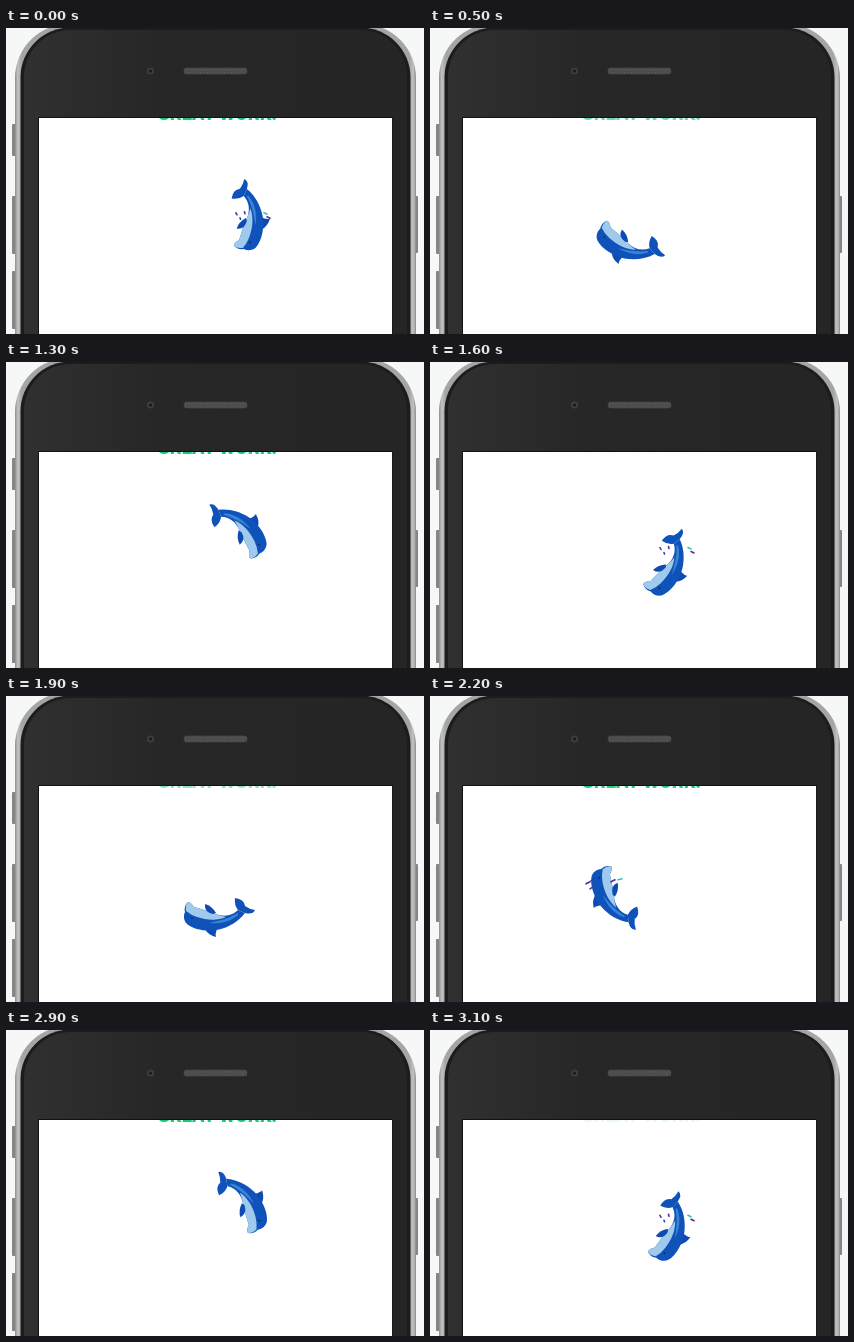
Animation of 418x306 px, one loop 3.2 s. Source, as an HTML page:

```html
<!DOCTYPE html>
<html lang="en">
<head>
<meta charset="utf-8">
<title>Dolphin loader</title>
<style>
  html, body { margin: 0; width: 100%; height: 100%; overflow: hidden; background: #f6f7f7; }
  svg { display: block; }
  #praise { font: 900 18.4px Roboto, sans-serif; fill: #1cc97c; text-anchor: middle; }
</style>
</head>
<body>
<svg width="418" height="306" viewBox="0 0 418 306">
  <defs>
    <pattern id="mesh" width="3" height="3" patternUnits="userSpaceOnUse">
      <rect width="3" height="3" fill="#444"/>
      <path d="M0 0L3 3M3 0L0 3" stroke="#5c5c5c" stroke-width=".7"/>
    </pattern>
    <linearGradient id="rim">
      <stop offset="0" stop-color="#8d8d8d"/>
      <stop offset=".007" stop-color="#c2c2c2"/>
      <stop offset=".016" stop-color="#a5a5a5"/>
      <stop offset=".984" stop-color="#a5a5a5"/>
      <stop offset=".993" stop-color="#c2c2c2"/>
      <stop offset="1" stop-color="#8d8d8d"/>
    </linearGradient>
    <linearGradient id="glass">
      <stop offset="0" stop-color="#303030"/>
      <stop offset=".35" stop-color="#272727"/>
      <stop offset="1" stop-color="#252525"/>
    </linearGradient>
  </defs>

  <g fill="#858585">
    <rect x="6" y="96" width="5" height="32" rx="1"/>
    <rect x="6" y="168" width="5" height="58" rx="1"/>
    <rect x="6" y="243" width="5" height="58" rx="1"/>
    <rect x="407" y="168" width="5" height="57" rx="1"/>
  </g>
  <rect x="9" y="-4" width="401" height="500" rx="54" fill="url(#rim)"/>
  <rect x="14.5" y="-.5" width="390" height="500" rx="50" fill="#1c1c1c"/>
  <rect x="18" y="2" width="383" height="500" rx="47" fill="url(#glass)"/>
  <circle cx="144.500" cy="43" r="3.500" fill="#3d3d3d"/>
  <circle cx="144.500" cy="43" r="1.500" fill="#16161c"/>
  <rect x="178" y="40" width="63" height="6" rx="2.500" fill="url(#mesh)" stroke="#484848" stroke-width=".7"/>
  <rect x="32" y="89" width="354.500" height="220" fill="#111"/>

  <svg x="33" y="90" width="353" height="216" viewBox="33 90 353 216">
    <rect x="33" y="90" width="353" height="216" fill="#fff"/>
    <text id="praise" x="211" y="92.300">GREAT WORK!</text>
    <!-- Swims around the local origin, facing right -->
    <g id="dolphin">
      <path fill="#0d4bb2" d="M0 -45Q2 -50 1 -53Q9 -51 12 -45Z"/>
      <path fill="#0f52b9" d="M-28 -29C-21 -38 -12 -43 -2 -45.500C9 -48 23 -46 30 -40C33 -37 34 -32 32 -28C33 -25 32 -20 29 -18C27 -18 25 -20 23 -23C16 -25 8 -27 1 -30C-7 -33 -15 -32 -21 -26Z"/>
      <path fill="#3a82d3" d="M-21 -31C-13 -38 -3 -40 8 -39C0 -37 -9 -36 -21 -29Z"/>
      <path fill="#9fcaee" d="M-9 -33C0 -37 11 -36 20 -33Q26 -31 31 -27Q32 -20 29 -18C27 -18 25 -20 23 -23C16 -25 8 -27 1 -30Q-4 -32 -9 -33Z"/>
      <path fill="#0f52b9" d="M-28 -29Q-36 -31 -38 -26Q-32 -25 -28 -22Q-27 -15 -18 -14Q-17 -21 -21 -26Z"/>
      <path fill="#0d4bb2" d="M4 -30Q13 -28 12 -20Q5 -22 1 -29Z"/>
      <circle cx="25" cy="-34" r=".9" fill="#082762"/>
    </g>
    <g id="drops" stroke-linecap="round"></g>
  </svg>
</svg>

<script>
const LOOP = 3200, STEP = 100;
const PURPLE = '#5131a8', TEAL = '#35c6b0', BLUE = '#1d49b0';

// [time, heading in degrees]
const headings = [[0, 92], [500, 204], [900, 310], [1600, 478], [2200, 602], [2600, 698], [3100, 830]];
const fadeStarts = [-1500, 75, 1590, 3035];

// Each burst shows while the heading is in range; drops are [x, y, dx, dy, colour]
const bursts = [
  { from: 65, to: 135, drops: [
    [230, 184, 1, 2, PURPLE], [238.500, 183, .5, 2, PURPLE], [234, 189, .5, 1.5, BLUE],
    [258, 184, 3, 1.5, TEAL], [261, 188, 3, 1.5, PURPLE]] },
  { from: 222, to: 272, drops: [
    [156, 187, 4, -2, PURPLE], [160, 192, 3, -2, PURPLE], [161, 184, 3, -1, BLUE],
    [181, 185, 4, -2, PURPLE], [188, 183, 4, -1, TEAL]] },
  { from: 272, to: 328, drops: [
    [194, 189, .5, .5, BLUE], [202, 189, .5, .5, PURPLE], [196.500, 194, .5, 1, BLUE]] }
];

const dolphin = document.getElementById('dolphin');
const drops = document.getElementById('drops');
const praise = document.getElementById('praise');

function headingAt(t) {
  const i = Math.max(1, headings.findIndex(([time]) => time >= t));
  const [t0, h0] = headings[i - 1], [t1, h1] = headings[i];
  return h0 + (h1 - h0) * (t - t0) / (t1 - t0);
}

function dropLine([x, y, dx, dy, colour], progress) {
  return `<path d="M${x} ${y + 2 * progress}l${dx} ${dy}" stroke="${colour}" stroke-width="1.600"/>`;
}

function draw(now) {
  const t = Math.floor(now % LOOP / STEP) * STEP;
  const heading = headingAt(t), turn = heading % 360;
  dolphin.setAttribute('transform', `translate(211 188) rotate(${heading})`);

  const burst = bursts.find(b => turn >= b.from && turn < b.to);
  drops.innerHTML = burst
    ? burst.drops.map(d => dropLine(d, (turn - burst.from) / (burst.to - burst.from))).join('')
    : '';

  const start = fadeStarts.filter(s => s <= t).pop();
  praise.setAttribute('opacity', Math.min(1, (t - start) / 650));
  requestAnimationFrame(draw);
}
requestAnimationFrame(draw);
</script>
</body>
</html>
```
